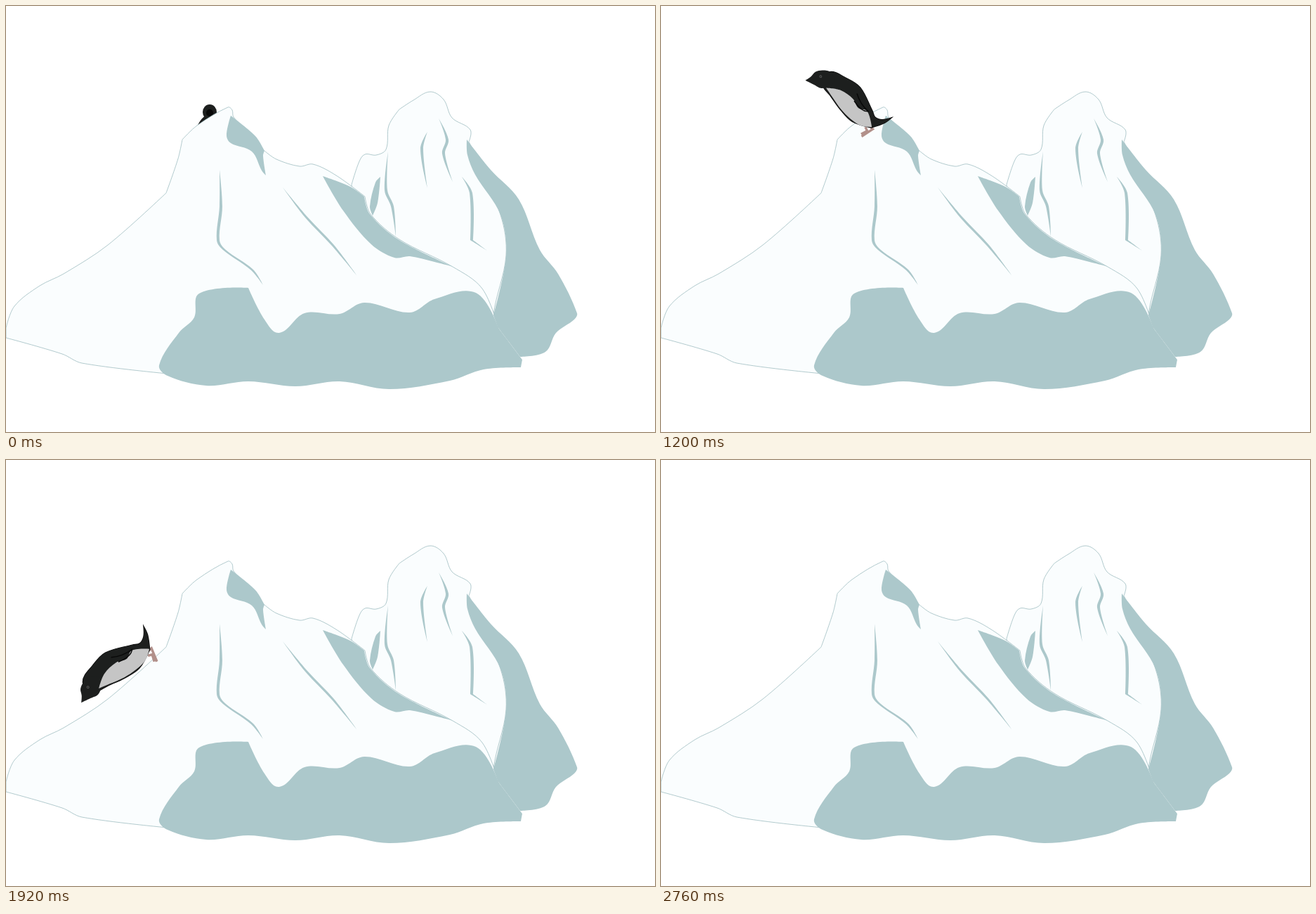
Write an HTML page with a canvas that moves like this. It is 924 px wide and 606 px high and loops after 2830 ms.

```html
<!DOCTYPE html>
<html lang="en">
<head>
<meta charset="utf-8">
<title>Sliding penguin</title>
<style>
html, body { margin: 0; width: 100%; height: 100%; overflow: hidden; background: #fff; }
canvas { display: block; }
</style>
</head>
<body>
<canvas id="stage" width="924" height="606"></canvas>
<script>
const ctx = document.getElementById('stage').getContext('2d');
const LOOP = 2830;
const ICE = '#fafdfe', SHADE = '#acc8cb', EDGE = '#9fbdc0';
const COAT = '#1d1f1e', BELLY = '#c5c5c5', FOOT = '#b2908a', INK = '#080808';

// "x,y" points; a trailing "!" marks a corner.
function parse(text) {
  return text.trim().split(/\s+/).map(p => {
    const [x, y] = p.split(',').map(parseFloat);
    return { x, y, corner: p.endsWith('!') };
  });
}

// Closed curve whose handles follow the neighbours, a third of each segment long.
function curve(pts) {
  const at = i => pts[(i + pts.length) % pts.length];
  const handle = (i, reach) => {
    const p = at(i), a = at(i - 1), b = at(i + 1);
    if (p.corner) return [p.x, p.y];
    const k = reach / 3 / Math.hypot(b.x - a.x, b.y - a.y);
    return [p.x + (b.x - a.x) * k, p.y + (b.y - a.y) * k];
  };
  const path = new Path2D();
  path.moveTo(pts[0].x, pts[0].y);
  pts.forEach((p, i) => {
    const q = at(i + 1), size = Math.hypot(q.x - p.x, q.y - p.y);
    path.bezierCurveTo(...handle(i, size), ...handle(i + 1, -size), q.x, q.y);
  });
  return path;
}

const shape = text => curve(parse(text));

// Thin crack: down one side and back up the other, pointed at both ends.
function crack(text) {
  const pts = parse(text), last = pts.length - 1;
  const tip = p => ({ ...p, corner: true });
  const shifted = dx => pts.slice(1, last).map(p => ({ ...p, x: p.x + dx }));
  return curve([tip(pts[0]), ...shifted(2), tip(pts[last]), ...shifted(-2).reverse()]);
}

function fill(path, color) {
  ctx.fillStyle = color;
  ctx.fill(path);
}

function line(path, color, width) {
  ctx.strokeStyle = color;
  ctx.lineWidth = width;
  ctx.stroke(path);
}

const ice = [
  `492,254! 503,221 511,211 527,212 541,204 545,170 560,147! 580,134 604,122 623,133 635,159
   661,176 659,193! 704,297 712,355 694,440 701,458! 500,330!`,
  `0,472! 0,458! 12,427 48,398 82,381 145,340 228,266! 245,217 251,190! 272,170 316,144 322,148
   324,158 368,206! 385,218 418,228 437,225 470,241 511,271! 519,296 560,332 636,371 678,402
   701,458! 500,500! 240,524! 108,508 80,495`
].map(shape);

const shades = [
  // right face, base, hollows
  ...[
    `656,190! 690,233 730,275 760,347 786,381 813,437 809,446 783,465 768,492 732,499! 701,458!
     694,440! 712,355 704,297 668,240 657,212`,
    `218,511 246,465 268,443 275,409 345,401! 368,446 389,465 425,437 475,438 510,422 575,436
     610,417 669,408 701,458! 735,503! 733,514! 680,517 632,533 546,545 475,534 412,541 345,534
     285,540 230,526`,
    '320,156! 355,185 368,206! 366,213 370,241! 364,234 350,207 320,195 314,184',
    '451,242! 490,257 510,271! 518,296 560,333 637,371! 610,364 575,356 553,358 520,339 480,291',
    '533,243! 529,280 522,298! 518,285 526,251'
  ].map(shape),
  ...[
    '304,233 306,285 302,333 311,347 350,375 366,397',
    '394,258 428,301 465,340 500,384',
    '544,207 541,262 550,285 555,328',
    '600,179 592,203 600,259',
    '616,160 628,190 623,210 636,250',
    '649,243 662,266 663,333! 685,348'
  ].map(crack)
];

// Side view lying on its belly, centred on the body
const bird = {
  coat: shape(`-48,-6 -23,-18 2,-23 40,-11 50,-7 60,-12 68,-24! 66,-11 57,8! 30,22 5,22 -20,18 -42,14`),
  belly: shape('-34,14! -16,1 7,-3 22,1 35,-5 57,7! 44,17 25,21 5,21 -18,17'),
  head: shape('-20,13! -14,5 -10,-4 0,-10 12,-11 22,2 8,16 -6,15'),
  wing: new Path2D('M5 -13Q20 -5 36 -6Q30 2 10 -2'),
  feet: new Path2D('M48 9L60 8L56 28M50 14L56 16L53 26')
};

function ellipse(x, y, rx, ry, color) {
  ctx.beginPath();
  ctx.ellipse(x, y, rx, ry, 0, 0, 2 * Math.PI);
  ctx.fillStyle = color;
  ctx.fill();
}

function drawFront(top) {
  ellipse(289, top + 67, 23, 52, COAT);
  ellipse(290, top + 69, 18, 50, BELLY);
  ellipse(290, top + 11, 10, 11, COAT);
  ellipse(290, top + 12, 5, 5, INK);
}

// upright 1 is standing with the neck stretched, 0 is lying
function drawSide({ x, y, angle, upright }, squeeze) {
  const rad = Math.PI / 180;
  const size = 1 - .1 * upright;
  ctx.save();
  ctx.translate(x, y);
  ctx.scale(size * squeeze, size);
  ctx.rotate(angle * rad);
  line(bird.feet, FOOT, 3.5);
  line(bird.coat, INK, 1.5);
  fill(bird.coat, COAT);

  ctx.save();
  ctx.translate(-46 - 10 * upright, 4 + 6 * upright);
  ctx.rotate(-43 * upright * rad);
  fill(bird.head, COAT);
  ellipse(0, 0, 2, 2, '#555');
  ellipse(0, 0, 1, 1, COAT);
  ctx.restore();

  fill(bird.belly, BELLY);
  line(bird.wing, INK, 1.5);
  ctx.restore();
}

// Stand, lean forward, dive, slide out
const poses = [
  { step: 7, x: 293, y: 119, angle: 75, upright: 1 },
  { step: 8, x: 293, y: 115, angle: 75, upright: 1 },
  { step: 13, x: 228, y: 152, angle: 0, upright: 0 },
  { step: 16, x: 199, y: 216, angle: -39, upright: 0 },
  { step: 23, x: 91, y: 399, angle: -26.5, upright: 0 },
  { step: 30, x: -28, y: 439, angle: -26, upright: 0 }
];

function poseAt(step) {
  const i = Math.max(1, poses.findIndex(p => step <= p.step));
  const a = poses[i - 1], b = poses[i];
  const u = (step - a.step) / (b.step - a.step);
  const mix = key => a[key] + (b[key] - a[key]) * u;
  return { x: mix('x'), y: mix('y'), angle: mix('angle'), upright: mix('upright') };
}

// The motion is stepped: slow while turning, fast while sliding.
function stepAt(t) {
  if (t < 700) return Math.floor(t / 100);
  if (t < 1100) return 7 + Math.floor((t - 700) / 200);
  if (t < 1500) return 9 + Math.floor((t - 1100) / 100);
  return 13 + Math.floor((t - 1500) / 70);
}

function drawMountain() {
  for (const part of ice) {
    fill(part, ICE);
    line(part, EDGE, .8);
  }
  shades.forEach(s => fill(s, SHADE));
}

function render(t) {
  const step = stepAt(t);
  ctx.clearRect(0, 0, 924, 606);
  if (step < 7) drawFront(140 - 11 * step - 7 * Math.max(0, step - 4));
  drawMountain();
  if (step >= 7 && step <= 30) drawSide(poseAt(step), step === 7 ? .7 : 1);
}

const start = performance.now();
function tick() {
  render((performance.now() - start) % LOOP);
  requestAnimationFrame(tick);
}
tick();
</script>
</body>
</html>
```
